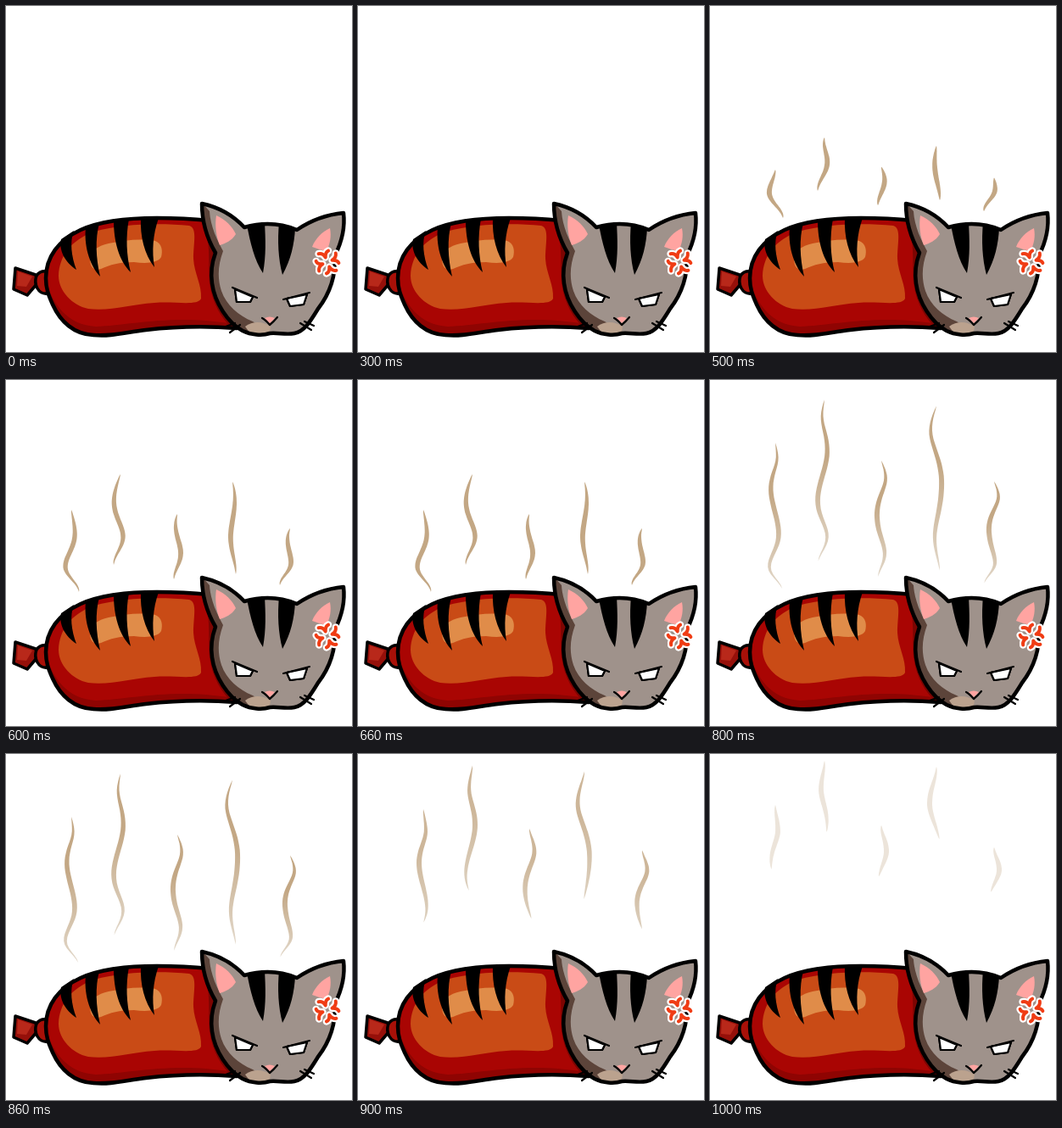
Animation of 408x408 px, one loop 1100 ms. Source, as an HTML page:

```html
<!DOCTYPE html>
<html lang="en">
<head>
<meta charset="utf-8">
<title>Grilled sausage cat</title>
<style>
  html, body { margin: 0; width: 100%; height: 100%; overflow: hidden; background: #fff; }
  svg { display: block; width: 100vw; height: 100vh; }
  .ink { stroke: #000; stroke-width: 4.5; stroke-linejoin: round; stroke-linecap: round; }
  .thin { stroke-width: 3.5; }
  .line { fill: none; stroke: #000; stroke-width: 2.2; stroke-linecap: round; stroke-linejoin: round; }
</style>
</head>
<body>
<svg viewBox="0 0 408 408">
  <defs>
    <linearGradient id="haze" x1="0" y1="0" x2="0" y2="1">
      <stop offset="0.35"/><stop offset="1"/>
    </linearGradient>
    <path id="headShape" d="M231 233C250 237 268 247 281 261C302 255 324 256 343 264C359 253 378 246 398 244C400 261 396 278 388 294C389 318 382 339 368 357C360 370 352 384 340 386C330 388 321 385 311 386C302 389 289 388 279 383C262 374 246 350 243 327C241 314 243 302 247 291C237 274 231 254 231 233Z"/>
    <clipPath id="headClip"><use href="#headShape"/></clipPath>
    <path id="bodyShape" d="M47 321C47 296 62 276 88 264C110 254 140 250 178 250C200 250 220 251 240 253L272 380C232 377 200 378 165 382C140 385 124 390 103 388C80 387 64 372 55 352C50 341 47 333 47 321Z"/>
    <clipPath id="bodyClip"><use href="#bodyShape"/></clipPath>
  </defs>

  <g id="steam" fill="url(#haze)"></g>

  <g id="sausage">
    <path class="ink thin" fill="#96100a" d="M11 309L35 317L37 327L25 341L9 334Z"/>
    <path fill="#b8281a" d="M14 313L31 319L24 331L13 330Z"/>
    <path class="ink thin" fill="#a81008" d="M48 313Q40 312 36 318Q33 326 37 333Q41 340 49 339Z"/>
    <use href="#bodyShape" fill="#a90503"/>
    <g clip-path="url(#bodyClip)">
      <path fill="#8f0402" d="M47 325C56 352 72 376 106 378C140 377 180 367 236 371L280 376V395H40Z"/>
      <path fill="#c94b16" d="M62 318C63 294 77 276 104 266C140 256 184 256 216 259C226 262 221 279 221 298C222 316 231 328 230 345C226 354 200 348 175 350C145 352 124 360 97 357C78 353 62 336 62 318Z"/>
      <path fill="#7c0502" d="M230 250C243 276 238 303 240 327C243 350 254 369 268 381L290 382V250Z"/>
      <path fill="#e08c49" d="M99 298C99 289 108 283 121 280C140 276 160 274 176 277C184 280 185 289 183 296C179 303 166 304 151 302C133 302 123 305 112 310C103 313 99 307 99 298Z"/>
    </g>
    <use href="#bodyShape" class="ink" fill="none"/>
    <path d="M65 275L80 265C75 278 77 295 83 311C69 302 62 287 65 275Z
             M94 261L110 256C105 275 106 297 111 319C97 304 92 280 94 261Z
             M127 253L145 251C141 272 142 294 147 314C133 300 127 277 127 253Z
             M159 250L180 250C173 270 172 289 175 308C163 293 158 271 159 250Z"/>
  </g>

  <g id="head">
    <use href="#headShape" fill="#9f928b"/>
    <g clip-path="url(#headClip)">
      <path fill="#5c443a" d="M229 230L240 242C241 260 249 276 256 289C250 306 249 320 254 336C260 353 274 365 291 372C300 377 302 383 300 392L235 385Z"/>
      <path fill="#bba28e" d="M282 378C290 372 302 371 312 378L310 390H291Z"/>
      <path fill="#ffa4a1" d="M248 247C259 252 267 260 271 269C266 277 259 280 252 282C248 272 246 259 248 247Z
               M382 262C373 266 365 274 361 284C367 286 372 288 378 289C382 281 384 272 382 262Z"/>
      <path d="M284 258L305 255C306 275 307 294 303 315C293 300 288 279 284 258Z
               M322 255L341 262C340 281 336 299 326 317C321 298 320 277 322 255Z"/>
    </g>
    <use href="#headShape" class="ink" fill="none"/>
    <path fill="#fff" class="line" d="M270 334L291 343L288 349L272 349ZM331 345L355 340L351 352L335 354Z"/>
    <path class="line" style="fill:#fff" d="M270 334L291 343L288 349L272 349ZM331 345L355 340L351 352L335 354Z"/>
    <path class="line" d="M267 332L296 344M327 346L358 338"/>
    <path fill="#ffa4a1" d="M305 368Q311 365 317 368L311 374Z"/>
    <path class="line" d="M302 368Q306 370 311 376Q315 373 320 367"/>
    <path class="line" d="M259 378L270 374M264 385L276 376M347 374L360 382M352 372L363 377"/>
  </g>

  <g id="anger" fill="none" stroke-linecap="round" stroke-linejoin="round" transform="translate(379 302) rotate(-22)"></g>
</svg>
<script>
const addPath = (parent, attrs = {}) => {
  const p = document.createElementNS("http://www.w3.org/2000/svg", "path");
  for (const k in attrs) p.setAttribute(k, attrs[k]);
  return document.getElementById(parent).appendChild(p);
};

for (const [stroke, width] of [["#fff", 8.5], ["#f03c14", 4]])
  for (let turn = 0; turn < 360; turn += 90)
    addPath("anger", { d: "M-6 -13Q-1 -12 0 -6Q2 -12 6 -12", transform: `rotate(${turn})`, stroke, "stroke-width": width });

// xs: the wave's turning points from top to bottom
const wisps = [
  { top: 60, bottom: 250, xs: [77, 80, 72, 81, 70, 86] },
  { top: 8, bottom: 218, xs: [135, 131, 138, 127, 138, 127] },
  { top: 84, bottom: 235, xs: [202, 208, 197, 206, 198] },
  { top: 15, bottom: 229, xs: [267, 259, 273, 265, 271] },
  { top: 110, bottom: 242, xs: [335, 341, 329, 336, 323] }
];

// visible part of each wisp (0 = top, 1 = bottom) and its colours
const TAN = "#c3a784";
const steps = [
  { from: 0.7, to: 1, tint: [TAN, TAN] },
  { from: 0.49, to: 1, tint: [TAN, TAN] },
  { from: 0.186, to: 1, tint: [TAN, TAN] },
  { from: 0.073, to: 0.98, tint: [TAN, "#e2d8ca"] },
  { from: 0.026, to: 0.73, tint: ["#cdb699", "#ddd1c0"] },
  { from: 0, to: 0.4, tint: ["#ece4da", "#ece4da"] }
];

function waveX(xs, u) {
  const last = xs.length - 1;
  const s = last * (u + 0.05 * Math.sin(2 * Math.PI * u));
  const i = Math.min(last - 1, Math.floor(s));
  return xs[i] + (xs[i + 1] - xs[i]) * (1 - Math.cos(Math.PI * (s - i))) / 2;
}

function outline({ top, bottom, xs }, { from, to }) {
  const n = 40, left = [], right = [];
  const tipShift = xs[0] - waveX(xs, from);
  for (let i = 0; i <= n; i++) {
    const v = i / n, u = from + (to - from) * v;
    const x = waveX(xs, u) + tipShift * (1 - v) ** 5;
    const y = (top + (bottom - top) * u).toFixed(1);
    const half = 3 * Math.sin(Math.PI * v) ** 0.65;
    left.push(`${(x - half).toFixed(1)} ${y}`);
    right.unshift(`${(x + half).toFixed(1)} ${y}`);
  }
  return "M" + left.concat(right).join("L") + "Z";
}

const plumes = wisps.map(() => addPath("steam"));
const stops = document.querySelectorAll("#haze stop");
const start = performance.now();
let shown;

function draw() {
  const t = (performance.now() - start) % 1100;
  const step = steps[Math.floor((t - 500) / 100)] || null;
  if (step !== shown) {
    shown = step;
    plumes.forEach((p, i) => p.setAttribute("d", step ? outline(wisps[i], step) : ""));
    if (step) stops.forEach((s, i) => s.setAttribute("stop-color", step.tint[i]));
  }
  requestAnimationFrame(draw);
}
draw();
</script>
</body>
</html>
```
